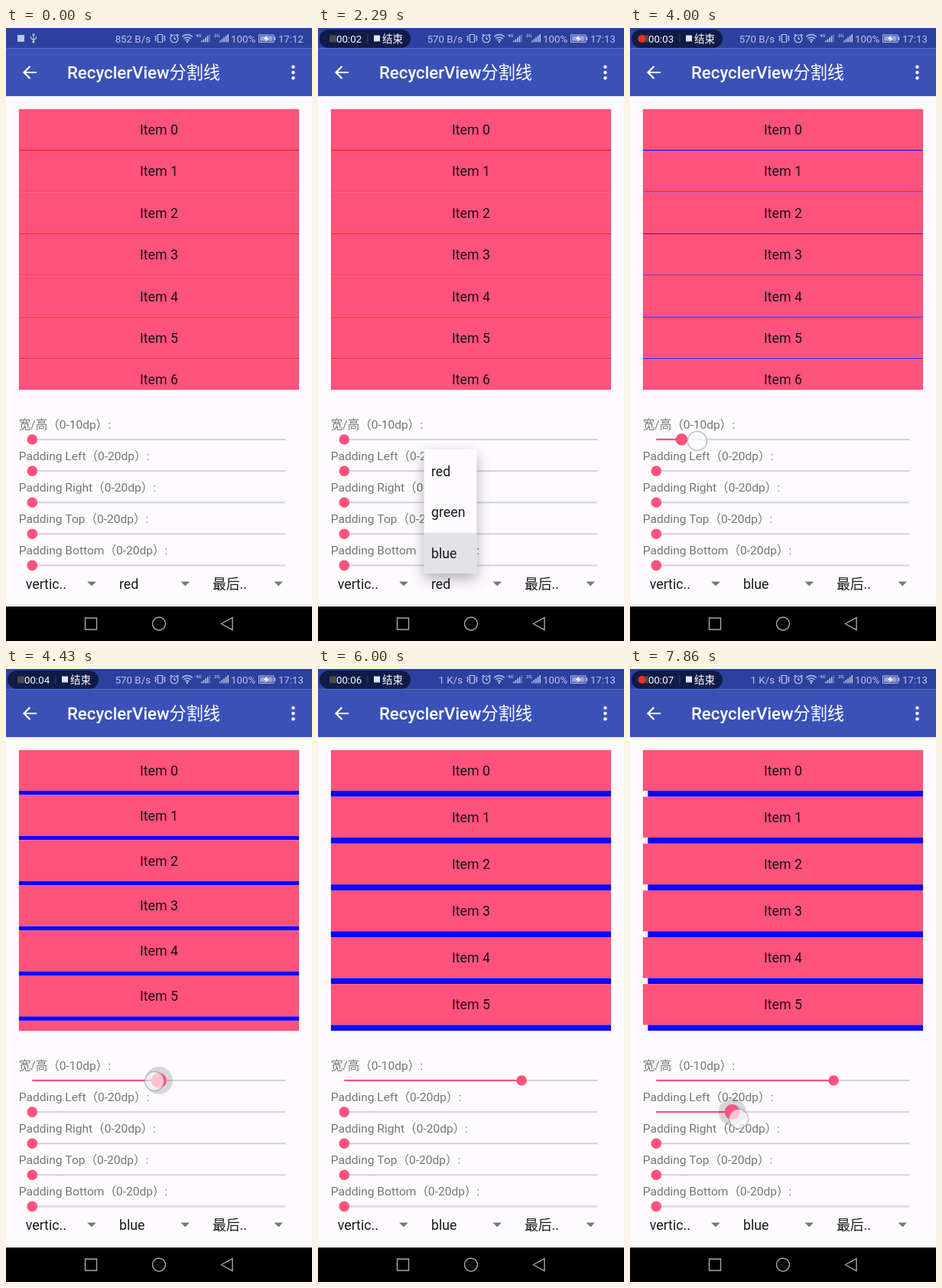
Recreate the animation shown at these times as an HTML page with a canvas. Size 400 by 800 pixels, loop 8000 ms.

```html
<!DOCTYPE html>
<html lang="zh-CN">
<head>
<meta charset="utf-8">
<style>
html, body { margin: 0; width: 100%; height: 100%; overflow: hidden; background: #fdfbfe; }
canvas { display: block; }
</style>
</head>
<body>
<canvas id="stage" width="400" height="800"></canvas>
<script>
const ctx = document.getElementById('stage').getContext('2d');
const LOOP = 8000, FPS = 7, DP = 400 / 360;
const PINK = '#ff527c', PAPER = '#fdfbfe', STATUS = '#bcc4e6';
const FONT = 'Roboto, "Noto Sans CJK SC", "Noto Sans CJK", sans-serif';
const TRACK_LEFT = 34.3, TRACK_LENGTH = 331.2;

// Seconds on the recorder, and when its lamp lights in each of them.
const TICKS = [140, 1290, 2280, 3140, 4280, 5140, 6000, 6860];
const LAMPS = [720, 1860, 2860, 3570, 4710, 5570, 6430, 7430];

// Finger gestures: [time, x, y]
const GESTURES = {
  open: [[430, 180, 724], [860, 180, 724]],
  pick: [[1860, 168, 687], [2290, 168, 687]],
  size: [[3570, 36, 538], [3860, 60, 538], [4000, 88, 539], [4290, 180, 538], [4430, 194, 538],
         [4570, 207, 538], [4860, 240, 538], [5000, 258, 538], [5290, 266, 538]],
  left: [[6860, 36, 580], [7140, 50, 581], [7500, 100, 585], [7860, 142, 587], [8000, 142, 587]]
};

const ramp = (t, from, to) => Math.min(1, Math.max(0, (t - from) / (to - from)));
const between = (t, from, to) => t >= from && t < to;

function fingerAt(keys, t) {
  if (t <= keys[0][0]) return keys[0].slice(1);
  const i = keys.findIndex(k => k[0] >= t);
  if (i < 0) return keys[keys.length - 1].slice(1);
  const a = keys[i - 1], b = keys[i], k = ramp(t, a[0], b[0]);
  return [a[1] + (b[1] - a[1]) * k, a[2] + (b[2] - a[2]) * k];
}

function sliderValue(keys, t, max) {
  if (t < keys[0][0]) return 0;
  return Math.round((fingerAt(keys, t - 50)[0] - TRACK_LEFT) / TRACK_LENGTH * max);
}

function rect(x, y, w, h, color) {
  ctx.fillStyle = color;
  ctx.fillRect(x, y, w, h);
}

function disc(x, y, r, color) {
  ctx.fillStyle = color;
  ctx.beginPath();
  ctx.arc(x, y, r, 0, 7);
  ctx.fill();
}

function text(str, x, y, size, color, align = 'left', weight = 400) {
  ctx.font = `${weight} ${size}px ${FONT}`;
  ctx.textAlign = align;
  ctx.fillStyle = color;
  ctx.fillText(str, x, y);
}

function stroke(path, color, width) {
  ctx.strokeStyle = color;
  ctx.lineWidth = width;
  ctx.stroke(new Path2D(path));
}

function fill(path, color) {
  ctx.fillStyle = color;
  ctx.fill(new Path2D(path));
}

function recorder(t) {
  if (t < TICKS[0]) {
    rect(15, 9, 9, 9, STATUS);
    stroke('M36 8V18M32.5 11V13.5L36 15.5L39.5 13.5V11', STATUS, 1.2);
    fill('M36 6.5L38 9.5H34Z', STATUS);
    disc(36, 18, 1.7, STATUS);
    return;
  }
  const second = TICKS.filter(tick => t >= tick).length - 1;
  ctx.fillStyle = '#101c48';
  ctx.beginPath();
  ctx.roundRect(2, 2, 119, 24, 12);
  ctx.fill();
  rect(15, 9.5, 9, 9, '#48484c');
  if (t >= LAMPS[second]) disc(15.5, 14, 5, '#f5301c');
  text('00:0' + second, 24, 18.6, 13.3, '#fff');
  rect(64.5, 8, 1, 12, '#3a4569');
  rect(73, 9.5, 8, 8, '#e4e6f0');
  text('结束', 84, 18.6, 13.5, '#fff');
}

function signal(x, label, lit) {
  text(label, x, 11.5, 6.2, STATUS, 'left', 500);
  for (let i = 0; i < 5; i++) {
    ctx.globalAlpha = i < lit ? 1 : .4;
    rect(x + 7 + i * 2.6, 16.5 - i * 2.1, 1.6, 2 + i * 2.1, STATUS);
  }
  ctx.globalAlpha = 1;
}

function statusBar(t) {
  rect(0, 0, 400, 26.7, '#2c409f');
  recorder(t);
  text(t < 2280 ? '852 B/s' : t < 5290 ? '570 B/s' : '1 K/s', 189, 18.6, 13.3, STATUS, 'right');
  stroke('M198.5 8.5H204.5V18.5H198.5ZM196.5 10L195 11.5L196.5 13.5L195 15.5L196.5 17' +
    'M206.5 10L208 11.5L206.5 13.5L208 15.5L206.5 17', STATUS, 1.2);
  stroke('M225 14A5 5 0 1 1 215 14A5 5 0 1 1 225 14M220 11V14.3H222.5' +
    'M214.3 10L216.8 8M225.7 10L223.2 8', STATUS, 1.2);
  stroke('M230 11.5Q237 5.5 244 11.5M232.3 14Q237 10 241.7 14M234.5 16.3Q237 14.3 239.5 16.3', STATUS, 1.4);
  disc(237, 18, 1.2, STATUS);
  signal(248, '4G', 4);
  signal(272, '2G', 5);
  text('100%', 294, 18.6, 13.3, STATUS);
  stroke('M330.5 9H350V18.5H330.5Z', STATUS, 1);
  rect(332, 10.5, 16.5, 6.5, '#98a4d4');
  rect(350.5, 11.5, 1.7, 4.5, STATUS);
  fill('M341.5 9.5L336.5 14.2H340L338.5 18L344 13.2H340.5Z', '#fff');
  text(t < 2280 ? '17:12' : '17:13', 389, 18.6, 13.3, STATUS, 'right');
}

function appBar() {
  rect(0, 26.7, 400, 62.2, '#3a52b8');
  stroke('M40 58H24M31.5 50L23.5 58L31.5 66', '#fff', 2.2);
  text('RecyclerView分割线', 80, 66.2, 22.2, '#fff', 'left', 500);
  for (const y of [50.7, 58, 65.3]) disc(375.5, y, 2.2, '#fff');
}

function list(size, padLeft, color) {
  const left = 16.7, top = 105.6, width = 366.6, row = 48 * DP;
  const divider = Math.max(1, size) * DP;
  ctx.save();
  ctx.beginPath();
  ctx.rect(left, top, width, 366.7);
  ctx.clip();
  for (let i = 0; i < 7; i++) {
    const y = top + i * (row + divider);
    rect(left, y, width, row, PINK);
    rect(left + padLeft * DP, y + row, width - padLeft * DP, divider, color);
    text('Item ' + i, 200, y + 33.2, 17.8, '#1c1216', 'center');
  }
  ctx.restore();
}

function slider(index, label, fraction = 0, press = 0) {
  const y = 537 + index * 41.1, x = TRACK_LEFT + TRACK_LENGTH * fraction;
  text(label, 16.7, y - 14, 15.55, '#757575');
  rect(TRACK_LEFT, y - 1.1, TRACK_LENGTH, 2.2, '#d8d6d9');
  rect(TRACK_LEFT, y - 1.1, x - TRACK_LEFT, 2.2, PINK);
  if (press) disc(x, y, 18 * press, 'rgba(0,0,0,.15)');
  disc(x, y, 6.8 + 3.2 * press, PINK);
}

function spinner(x, label) {
  text(label, x, 731.6, 17.8, '#1c1a1d');
  const a = x + 80.5;
  fill(`M${a} 722.5h11.5l-5.75 5.8Z`, '#757575');
}

function popup(t) {
  const alpha = ramp(t, 720, 1140) * (1 - ramp(t, 2480, 2860));
  if (!alpha) return;
  const grow = ramp(t, 720, 1140), top = 712 - 162 * grow;
  ctx.save();
  ctx.globalAlpha = alpha;
  ctx.shadowColor = 'rgba(0,0,0,.3)';
  ctx.shadowBlur = 18;
  ctx.shadowOffsetY = 7;
  ctx.fillStyle = PAPER;
  ctx.beginPath();
  ctx.roundRect(138.5, top, 69, 712 - top, 2);
  ctx.fill();
  ctx.shadowColor = 'transparent';
  ctx.clip();
  if (between(t, 2000, 2570)) rect(138.5, 658.7, 69, 53.3, 'rgba(0,0,0,.1)');
  ['red', 'green', 'blue'].forEach((name, i) => text(name, 148, 585 + i * 53.3, 17.8, '#1c1a1d'));
  ctx.restore();
}

function finger(t) {
  for (const keys of Object.values(GESTURES)) {
    if (!between(t, keys[0][0], keys[keys.length - 1][0])) continue;
    const [x, y] = fingerAt(keys, t);
    disc(x, y, 12.5, 'rgba(255,255,255,.65)');
    ctx.strokeStyle = 'rgba(130,140,195,.55)';
    ctx.lineWidth = 1.5;
    ctx.beginPath();
    ctx.arc(x, y, 12.5, 0, 7);
    ctx.stroke();
  }
}

function navBar() {
  const gray = '#a8a8a8';
  rect(0, 755, 400, 45, '#000');
  stroke('M103.5 770H118.5V785H103.5ZM208.5 777.5A8.5 8.5 0 1 1 191.5 777.5A8.5 8.5 0 1 1 208.5 777.5Z' +
    'M281.5 777.5L296 769.5V785.5Z', gray, 1.4);
}

function draw(t) {
  const size = sliderValue(GESTURES.size, t, 10);
  const left = sliderValue(GESTURES.left, t, 20);
  const color = t < 2430 ? 'red' : 'blue';
  rect(0, 0, 400, 800, PAPER);
  statusBar(t);
  appBar();
  list(size, left, color === 'red' ? '#ff0a0a' : '#0808ff');
  slider(0, '宽/高（0-10dp）:', size / 10, ramp(t, 3860, 4290) * (1 - ramp(t, 5290, 5570)));
  slider(1, 'Padding Left（0-20dp）:', left / 20, ramp(t, 7140, 7570));
  slider(2, 'Padding Right（0-20dp）:');
  slider(3, 'Padding Top（0-20dp）:');
  slider(4, 'Padding Bottom（0-20dp）:');
  spinner(25.7, 'vertic..');
  spinner(148, color);
  spinner(270, '最后..');
  popup(t);
  finger(t);
  navBar();
}

const start = performance.now();
function tick() {
  const elapsed = (performance.now() - start) % LOOP;
  const step = Math.floor((elapsed + 6) / 1000 * FPS) % (LOOP / 1000 * FPS);
  draw(Math.round(step / FPS * 100) * 10);
  requestAnimationFrame(tick);
}
tick();
</script>
</body>
</html>
```
